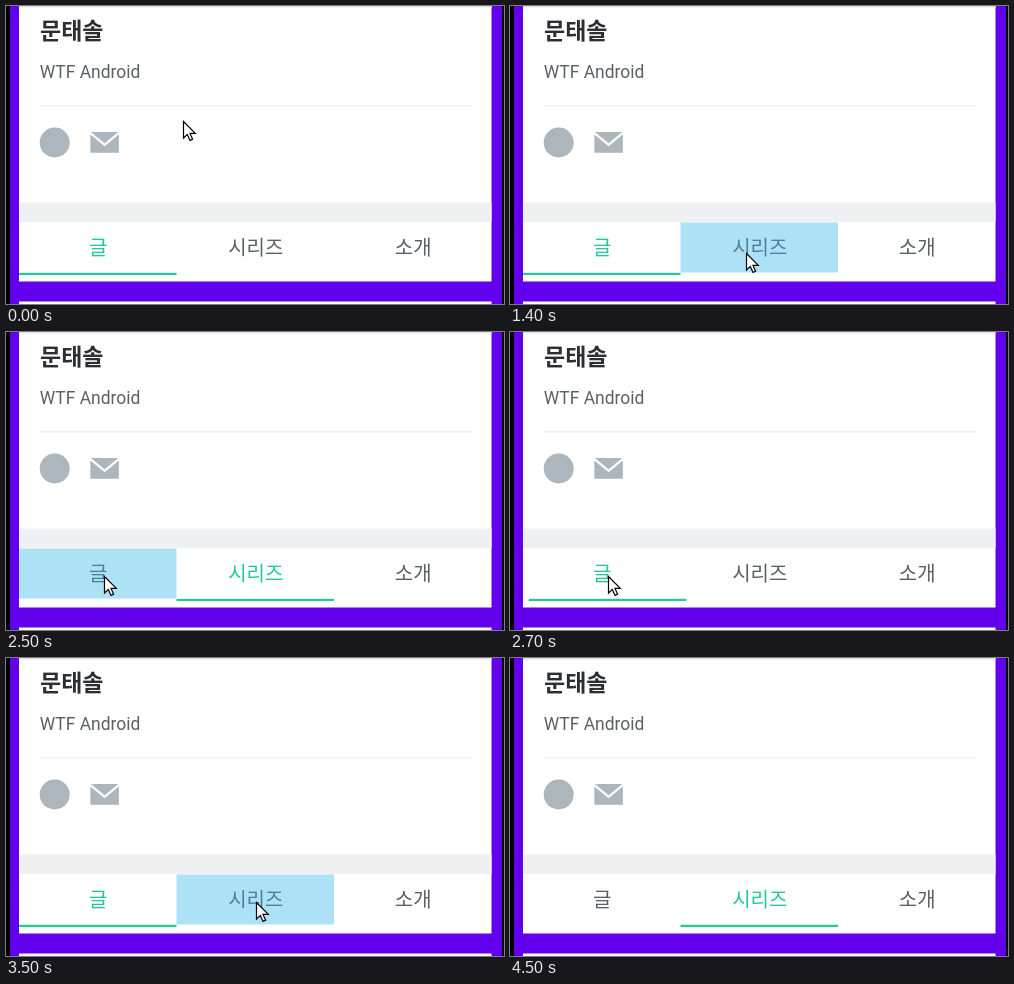
Write an HTML page that moves like this. It is 498x298 px and loops after 4800 ms.

```html
<!DOCTYPE html>
<html lang="ko">
<head>
<meta charset="utf-8">
<style>
html, body { margin: 0; height: 100%; overflow: hidden; background: #000; }
svg { display: block; }
text { font-family: "Noto Sans CJK KR", "Noto Sans CJK", sans-serif; fill: #596066; }
.name { font-size: 23px; font-weight: 700; fill: #2b2f33; }
.bio { font: 17.45px Roboto, sans-serif; }
.tab { font-size: 20px; text-anchor: middle; }
.tab.on { fill: #20c997; }
</style>
</head>
<body>
<svg width="498" height="298" viewBox="0 0 498 298">
  <defs>
    <linearGradient id="shade" x2="0" y2="1">
      <stop stop-color="#d4d4d4"/><stop offset="1" stop-color="#fff"/>
    </linearGradient>
  </defs>
  <path fill="#6200ee" d="M4 0H496V298H4z"/>
  <path fill="#fff" d="M13 0H485.5V275.5H13zM13 295.5H485.5V298H13z"/>
  <path fill="url(#shade)" d="M13 0H485.5V2H13z"/>
  <path fill="#eff0f2" d="M13 196.5H485.5V216H13z"/>
  <path fill="#e9ecef" d="M34 99.2H466V100.4H34z"/>
  <text class="name" x="34" y="33.2">문태솔</text>
  <text class="bio" x="33.7" y="72.3">WTF Android</text>
  <g fill="#adb5bd">
    <circle cx="48.7" cy="136.5" r="15"/>
    <path transform="translate(83.4 121.2) scale(.95)" d="M16 16.871L1.466 5H30.533zM16 20.017L1 7.764V27H31V7.764z"/>
  </g>
  <text class="tab" x="92.2" y="249.3">글</text>
  <text class="tab" x="249.8" y="249.3">시리즈</text>
  <text class="tab" x="407.2" y="249.3">소개</text>
  <rect id="bar" y="266.8" width="157.5" height="2.2" fill="#20c997"/>
  <rect id="tap" y="216.5" width="157.5" height="50" fill="#33b5e5" fill-opacity=".4"/>
  <path id="cursor" fill="#fff" stroke="#000" stroke-width="1.2" d="M.5 .5V17L4.3 13.4L7 19.4L9.6 18.3L7 12.4H12.3z"/>
</svg>
<script>
const LOOP = 4800, STEP = 100, LEFT = 13, TAB = 157.5, SLIDE = 300;
const $ = id => document.getElementById(id);
const tabs = document.querySelectorAll('.tab');
const clamp = u => Math.min(1, Math.max(0, u));
const easeInOut = u => u * u * u * (u * (6 * u - 15) + 10);
const easeOut = u => 1 - (1 - u) ** 3;

const home = { x: 177, y: 115 };
const moves = [
  { start: 400, end: 1000, x: 236, y: 247 },
  { start: 1700, end: 2200, x: 98, y: 244 },
  { start: 2800, end: 3200, x: 250, y: 244 },
  { start: 3700, end: 4400, x: 56, y: 0 }
];
const GONE = 4500;
const taps = [{ at: 1400, tab: 1 }, { at: 2500, tab: 0 }, { at: 3500, tab: 1 }];

function pointer(t) {
  let { x, y } = home;
  for (const m of moves) {
    const u = easeInOut(clamp((t - m.start) / (m.end - m.start)));
    x += (m.x - x) * u;
    y += (m.y - y) * u;
  }
  return [Math.round(x), Math.round(y)];
}

function draw(now) {
  // the screen refreshes ten times a second
  const t = Math.floor(now % LOOP / STEP) * STEP;
  let pos = 0, active = 0, pressed = -1;
  for (const { at, tab } of taps) {
    if (t < at) break;
    pos += (tab - pos) * easeOut(clamp((t - at) / SLIDE));
    if (t < at + STEP) pressed = tab;
    else active = tab;
  }
  tabs.forEach((tab, i) => tab.classList.toggle('on', i === active));
  $('bar').setAttribute('x', LEFT + TAB * pos);
  $('tap').setAttribute('x', LEFT + TAB * pressed);
  $('tap').setAttribute('visibility', pressed < 0 ? 'hidden' : 'visible');
  $('cursor').setAttribute('transform', `translate(${pointer(t)})`);
  $('cursor').setAttribute('visibility', t < GONE ? 'visible' : 'hidden');
}

const begin = performance.now();
function tick() {
  draw(performance.now() - begin);
  requestAnimationFrame(tick);
}
tick();
</script>
</body>
</html>
```
